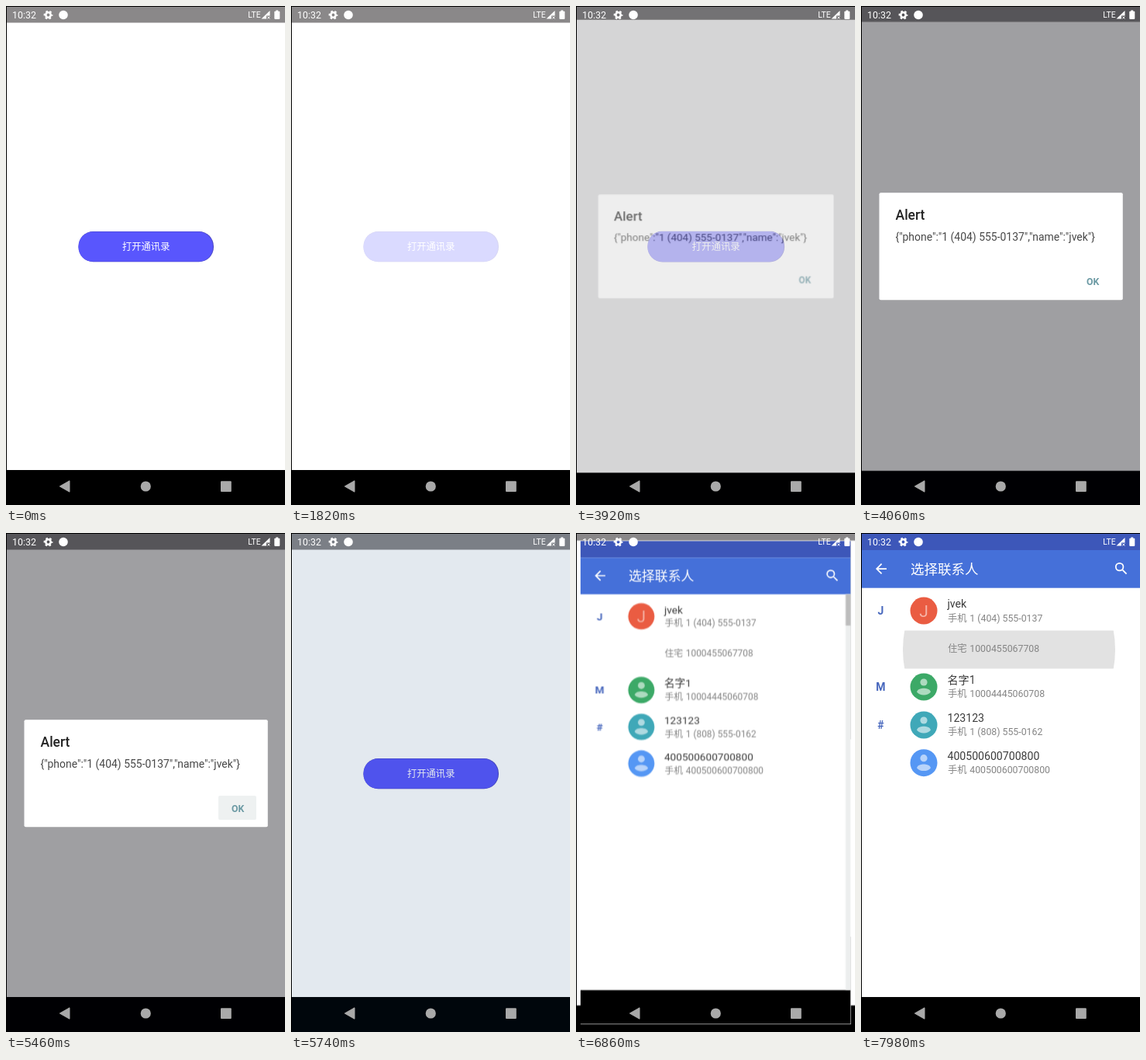
An HTML page that plays this animation: 360x642 px, repeating every 8 s.

```html
<!DOCTYPE html>
<html lang="zh-CN">
<head>
<meta charset="utf-8">
<title>Contact picker</title>
<style>
  html, body { margin: 0; width: 100%; height: 100%; overflow: hidden; background: #000; }
  svg { display: block; width: 100%; height: 100%; }
  text { font-family: Roboto, "Noto Sans CJK SC", "Noto Sans CJK", sans-serif; }

  /* every animation shares the 8 s clock: 1% = 80 ms */
  #home, #page, #bar, #btn, #dim, #alert, #ok, .ripple {
    animation: 8s linear infinite;
  }
  #home, #page { transform-origin: 180px 321px; }
  #home { animation-name: home; }
  #page { animation-name: page, page-fade; }
  #bar { animation-name: bar; }
  #btn { animation-name: press; }
  #dim { animation-name: dim; }
  #alert { animation-name: alert; transform-origin: 180px 309px; }
  #ok { animation-name: ok; }
  #rip1 { animation-name: rip1; }
  #rip2 { animation-name: rip2; }

  .name { font-size: 14.1px; fill: #3c3c3c; }
  .tel { font-size: 12.3px; fill: #858585; }
  .sec { font-size: 14px; font-weight: 700; fill: #4767bd; text-anchor: middle; }

  /* two-part curve: quick start, very slow finish */
  @keyframes home {
    0%, 25.2125%, 83.8375% { transform: scale(1); animation-timing-function: cubic-bezier(.3, 0, .8, .15); }
    26.4625%, 85.0875% { transform: scale(1.02); animation-timing-function: cubic-bezier(.05, .7, .1, 1); }
    32.7125%, 44.49% { transform: scale(1.05); }
    44.5% { transform: scale(1.1); animation-timing-function: cubic-bezier(.3, 0, .8, .15); }
    46.1625% { transform: scale(1.06); animation-timing-function: cubic-bezier(.1, .6, .5, .95); }
    52.5% { transform: scale(1); }
    91.3375%, 100% { transform: scale(1.05); }
  }
  @keyframes page {
    0%, 25.2125%, 83.8375% { transform: scale(.85); animation-timing-function: cubic-bezier(.3, 0, .8, .15); }
    26.4625%, 85.0875% { transform: scale(.91); animation-timing-function: cubic-bezier(.05, .7, .1, 1); }
    32.7125% { transform: scale(1); }
    44.5% { transform: scale(1); animation-timing-function: cubic-bezier(.3, 0, .8, .15); }
    46.1625% { transform: scale(.96); }
    52.5% { transform: scale(.85); }
    91.3375%, 100% { transform: scale(1); }
  }
  @keyframes page-fade {
    0%, 25.8% { opacity: 0; }
    26.7%, 45% { opacity: 1; }
    46.1%, 84.4% { opacity: 0; }
    85.3%, 100% { opacity: 1; }
  }
  @keyframes bar {
    0%, 32.7% { opacity: 1; }
    34.9%, 50% { opacity: 0; }
    50.1%, 91.3% { opacity: 1; }
    93.5%, 100% { opacity: 0; }
  }
  @keyframes press {
    0%, 22.7% { opacity: 1; }
    22.72%, 25.375% { opacity: .22; }
    27.5%, 80.3% { opacity: 1; }
    81.3%, 84% { opacity: .22; }
    86.3%, 100% { opacity: 1; }
  }
  @keyframes dim {
    0%, 47.875% { fill: rgba(0, 0, 8, 0); }
    50.5%, 70.6% { fill: rgba(0, 0, 8, .378); }
    71.75% { fill: rgba(8, 55, 110, .11); }
    72.5%, 100% { fill: rgba(8, 55, 110, 0); }
  }
  @keyframes alert {
    0%, 48.1% { opacity: 0; transform: scale(.92); animation-timing-function: ease-out; }
    50.3%, 70.5% { opacity: 1; transform: scale(1); }
    71.25%, 100% { opacity: 0; transform: scale(1); }
  }
  @keyframes ok {
    0%, 68.2% { opacity: 0; }
    68.22% { opacity: .5; }
    69.1%, 72% { opacity: 1; }
    72.1%, 100% { opacity: 0; }
  }
  @keyframes rip1 {
    0%, 38.45% { r: 0; opacity: 1; }
    38.47% { r: 20px; }
    40.2%, 41.95% { r: 59px; opacity: 1; }
    43.75%, 100% { r: 140px; opacity: 0; }
  }
  @keyframes rip2 {
    0%, 97.08% { r: 0; }
    97.1% { r: 34px; }
    99.75%, 100% { r: 137px; }
  }
</style>
</head>
<body>
<svg viewBox="0 0 360 642">
  <defs>
    <clipPath id="row1"><rect x="1" y="76" width="359" height="49"/></clipPath>
    <clipPath id="row2"><rect x="1" y="125.500" width="359" height="49"/></clipPath>
    <g id="person" fill="#fff" fill-opacity=".58">
      <circle cy="-6" r="4.600"/>
      <path d="M-9 6.500C-8 2.500-3 1.700 0 1.700S8 2.500 9 6.500C7 9.200 3.500 10.400 0 10.400S-7 9.200-9 6.500Z"/>
    </g>
  </defs>

  <g id="home">
    <rect width="360" height="642"/>
    <rect width="360" height="22" fill="#8a8889"/>
    <rect y="21.500" width="360" height="575.500" fill="#fff"/>
    <g id="btn">
      <rect x="93.500" y="290" width="174.500" height="39.300" rx="19" fill="#4c48c4"/>
      <rect x="93.500" y="290.500" width="173.500" height="38.300" rx="18.500" fill="#5956fd"/>
      <text x="180.700" y="314.300" font-size="12.300" fill="#fff" text-anchor="middle">打开通讯录</text>
    </g>
  </g>

  <g id="page">
    <rect width="360" height="642"/>
    <rect width="360" height="597" fill="#fff"/>
    <rect width="360" height="22" fill="#3d57b9"/>
    <rect y="22" width="360" height="48.700" fill="#4570d9"/>
    <g fill="#fff">
      <path transform="translate(15.500 35.500) scale(.875)" d="M20 11H7.830l5.590-5.590L12 4l-8 8 8 8 1.410-1.410L7.830 13H20v-2z"/>
      <text x="64" y="52.600" font-size="17.500">选择联系人</text>
      <g transform="translate(325.300 35.300) scale(.875)">
        <circle cx="9.500" cy="9.500" r="5.500" fill="none" stroke="#fff" stroke-width="2"/>
        <path d="M13.300 14.700l1.400-1.400 5.800 5.700-1.500 1.500z"/>
      </g>
    </g>

    <g fill="#e2e2e2">
      <g clip-path="url(#row1)"><circle id="rip1" class="ripple" cx="83" cy="100.500" r="0"/></g>
      <g clip-path="url(#row2)"><circle id="rip2" class="ripple" cx="191" cy="150" r="0"/></g>
    </g>

    <text class="sec" x="25.500" y="105">J</text>
    <text class="sec" x="25.500" y="203">M</text>
    <text class="sec" x="25.500" y="252">#</text>

    <g transform="translate(0 100)">
      <circle cx="81" r="17.500" fill="#ea5c42"/>
      <text x="81" y="7.500" font-size="21" fill="#f6b3a6" text-anchor="middle">J</text>
      <text class="name" x="111.500" y="-4">jvek</text>
      <text class="tel" x="112" y="13.500">手机</text>
      <text class="tel" x="140.300" y="13.500">1 (404) 555-0137</text>
      <text class="tel" x="112" y="53">住宅</text>
      <text class="tel" x="140.300" y="53">1000455067708</text>
    </g>
    <g transform="translate(0 198)">
      <circle cx="81" r="17.500" fill="#3ca967"/>
      <use href="#person" x="81"/>
      <text class="name" x="111.500" y="-4">名字1</text>
      <text class="tel" x="112" y="13.300">手机</text>
      <text class="tel" x="140.300" y="13.300">10004445060708</text>
    </g>
    <g transform="translate(0 247)">
      <circle cx="81" r="17.500" fill="#3fa8b8"/>
      <use href="#person" x="81"/>
      <text class="name" x="111.500" y="-4">123123</text>
      <text class="tel" x="112" y="13.300">手机</text>
      <text class="tel" x="140.300" y="13.300">1 (808) 555-0162</text>
    </g>
    <g transform="translate(0 295.700)">
      <circle cx="81" r="17.500" fill="#5597f4"/>
      <use href="#person" x="81"/>
      <text class="name" x="111.500" y="-4">400500600700800</text>
      <text class="tel" x="112" y="13.300">手机</text>
      <text class="tel" x="140.300" y="13.300">400500600700800</text>
    </g>

    <g id="bar">
      <rect x="353.500" y="70.700" width="6.500" height="526.300" fill="#eceeee"/>
      <rect x="353.500" y="70.700" width="6.500" height="41.500" fill="#bdbdbd"/>
    </g>
  </g>

  <rect id="dim" width="360" height="642" fill="none"/>

  <g id="alert">
    <rect x="23.500" y="240.300" width="314.300" height="138" rx="2" fill="#fff"/>
    <text x="44.500" y="275" font-size="17.500" font-weight="500" fill="#222">Alert</text>
    <text x="44.500" y="302" font-size="13.950" fill="#484848">{"phone":"1 (404) 555-0137","name":"jvek"}</text>
    <rect id="ok" x="274" y="338" width="49" height="31" rx="2" fill="#dfe5e6"/>
    <text x="299.200" y="358.800" font-size="12.300" font-weight="700" fill="#6c9aa4" text-anchor="middle">OK</text>
  </g>

  <path d="M0 0H360V1H1V642H0Z"/>

  <g fill="#fff">
    <text x="8" y="16" font-size="12.400">10:32</text>
    <circle cx="54.500" cy="11.500" r="3.200" fill="none" stroke="#fff" stroke-width="2.600"/>
    <circle cx="54.500" cy="11.500" r="5" fill="none" stroke="#fff" stroke-width="1.800" stroke-dasharray="2.620 2.620" stroke-dashoffset="1.310"/>
    <circle cx="74" cy="11.500" r="5.800"/>
    <text x="312.300" y="15.300" font-size="10.400">LTE</text>
    <path d="M340.500 6V12.500H336V16.500H329.500Z"/>
    <path d="M337.300 13.500l3 3m0-3l-3 3" stroke="#fff" stroke-width="1"/>
    <path d="M348.300 5.500h2.900v1.200h1.300q.8 0 .8.800v8.600q0 .8-.8.800h-5.400q-.8 0-.8-.8V7.500q0-.8.8-.8h1.200z"/>
  </g>

  <g fill="#a9a9a9">
    <path d="M69.300 618L82 610.800V625.200Z" stroke="#a9a9a9" stroke-linejoin="round"/>
    <circle cx="180.300" cy="618" r="6.600"/>
    <rect x="277" y="611.300" width="13.800" height="13.600" rx="1"/>
  </g>
</svg>
</body>
</html>
```
